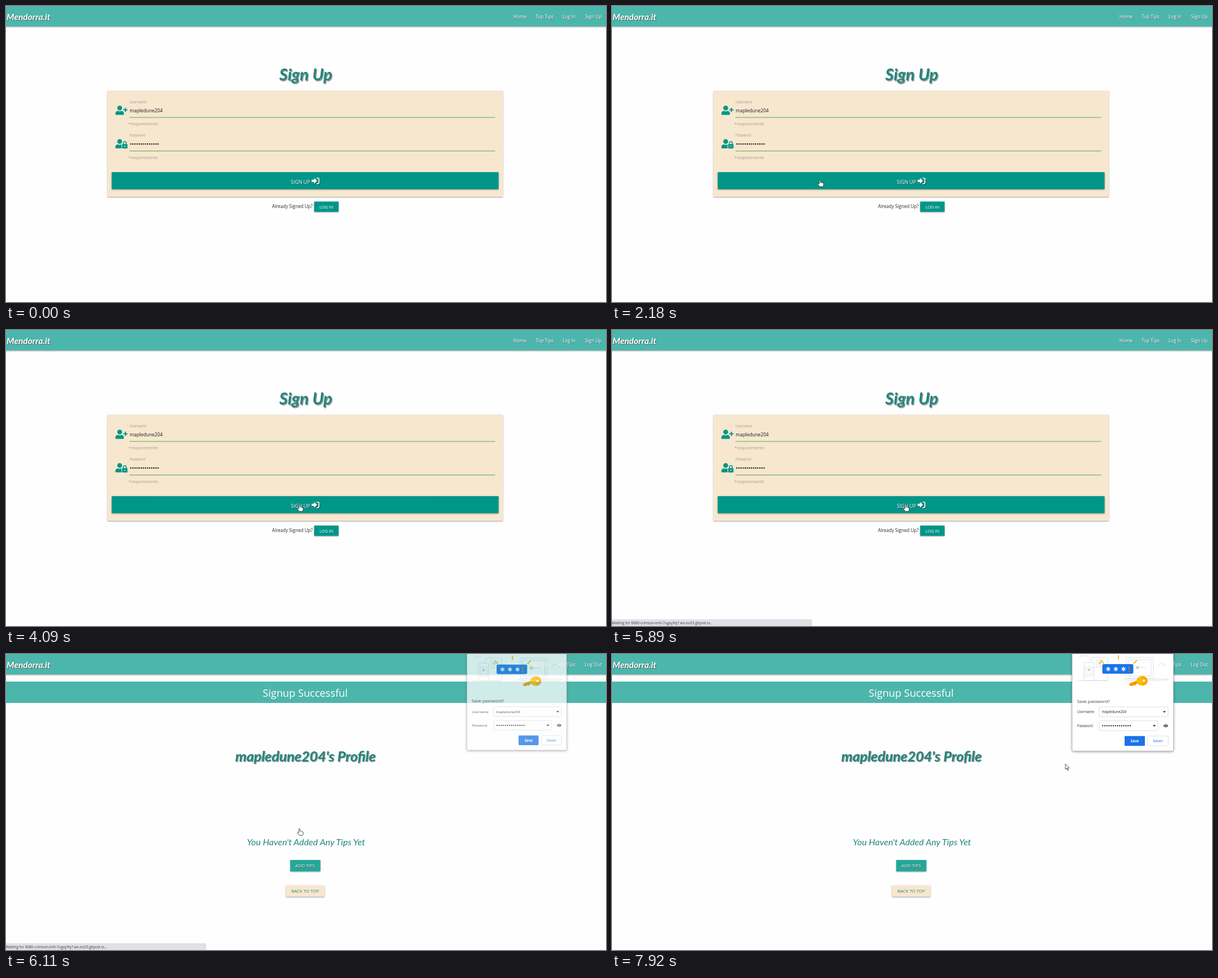
These frames come from a looping animation (1064 by 526 pixels, 7.99 s). An HTML page:

```html
<!DOCTYPE html>
<html lang="en">
<head>
<meta charset="utf-8">
<title>Sign up</title>
<style>
  html, body { margin: 0; width: 100%; height: 100%; overflow: hidden; background: #fefefe; }
  svg { display: block; width: 1064px; height: 526px; font-family: "Open Sans", "Noto Sans", sans-serif; }
  .script { font-family: Lato, "Open Sans", sans-serif; font-style: italic; font-weight: 700; fill: #23857c; }
  .brand { fill: #fff; text-shadow: 1px 1px 1px #45635f; }
  .title { text-shadow: 1.5px 1.5px 1px #8d9795; }
  .nav { font-size: 8.2px; fill: #fff; text-shadow: 1px 1px 1px #46706b; }
  .shade { text-shadow: 1px 1px 1px #24534e; }
  .raised { filter: drop-shadow(0 1px 1px rgba(0,0,0,.38)); }
  .mid { text-anchor: middle; }
  .hint { fill: #9d9c95; }
  .dots { stroke: #222; stroke-linecap: round; fill: none; }
  .art { fill: #fff; stroke: #dadce0; stroke-width: .9; }
  .field { fill: #fff; stroke: #d4d7db; stroke-width: .8; }
</style>
</head>
<body>
<svg viewBox="0 0 1064 526" xmlns="http://www.w3.org/2000/svg">
  <defs>
    <g id="person">
      <circle cx="7.6" cy="4.3" r="4.3"/>
      <path d="M0 16.6V14C0 11.300 2 9.600 4.500 9.600Q7.600 11 10.700 9.600C13.200 9.600 15.100 11.300 15.100 14V15.300Q15.100 16.600 13.800 16.600H1.300Q0 16.600 0 15.300Z"/>
    </g>
  </defs>

  <rect width="1064" height="526" fill="#fefefe"/>
  <g class="raised">
    <rect width="1064" height="36.300" fill="#4db6ac"/>
  </g>
  <text class="script brand" x="1" y="24.500" font-size="15.500">Mendorra.it</text>

  <g id="signup">
    <g class="nav">
      <text x="900" y="21.500">Home</text><text x="939.5" y="21.500">Top Tips</text>
      <text x="987" y="21.500">Log In</text><text x="1027" y="21.500">Sign Up</text>
    </g>
    <text class="script title mid" x="531.500" y="132" font-size="29">Sign Up</text>
    <rect class="raised" x="180" y="150.500" width="701" height="188.500" rx="1" fill="#f7e7cf"/>

    <g fill="#009688">
      <use href="#person" x="194" y="177"/>
      <path d="M208 184.500h7.500M211.750 180.700v7.600" stroke="#009688" stroke-width="2"/>
      <use href="#person" x="194" y="236.500"/>
      <path d="M205 244.500h10.800v9.500h-10.800z" fill="#f7e7cf"/>
      <rect x="206" y="245.200" width="9.400" height="8" rx="1"/>
      <path d="M208.200 245.500v-2a2.500 2.500 0 0 1 5 0v2" fill="none" stroke="#009688" stroke-width="1.500"/>
      <circle cx="210.700" cy="249.200" r="1" fill="#f7e7cf"/>
    </g>
    <g class="hint" font-size="6.200">
      <text x="219" y="172.500">Username</text><text x="219" y="232">Password</text>
    </g>
    <g class="hint" font-size="7.700">
      <text x="217" y="212">*requirements</text><text x="217" y="271.500">*requirements</text>
    </g>
    <text class="user" x="219.300" y="188.500" font-size="8.300" fill="#1d1d1d"></text>
    <path class="dots" d="M221.300 245.300h48.600" stroke-width="2.500" stroke-dasharray="0 3.720"/>
    <path d="M219 198h648.500" stroke="#4caf50"/>
    <path d="M219 257.700h648.500" stroke="#52a05a"/>

    <rect id="submit" class="raised" x="187.500" y="295.200" width="686" height="30.300" rx="1" fill="#009688"/>
    <circle id="ripple" cx="520" cy="310" r="7" fill="#fff" opacity=".2"/>
    <text class="shade" x="505.300" y="315.500" font-size="8.600" fill="#fff">SIGN UP</text>
    <g fill="#fff" style="filter:drop-shadow(1px 1px .5px #1d4d48)">
      <path d="M542 308.800h4.400v-3.300l5.200 5.300-5.200 5.300v-3.300h-4.400z"/>
      <path d="M550.800 306h2.700q1.500 0 1.500 1.500v6.600q0 1.500-1.500 1.500h-2.700" fill="none" stroke="#fff" stroke-width="1.700"/>
    </g>
    <text x="471.800" y="359" font-size="8.050" fill="#2b2b2b">Already Signed Up?</text>
    <rect class="raised" x="546.500" y="347.500" width="43.300" height="18.300" rx="1" fill="#009688"/>
    <text class="mid" x="568.200" y="359.500" font-size="7.400" fill="#fff">LOG IN</text>
  </g>

  <g id="profile">
    <g class="nav">
      <text x="889" y="21.500">Profile</text><text x="929.500" y="21.500">Top Tips</text>
      <text x="977" y="21.500">Add Tips</text><text x="1026.500" y="21.500">Log Out</text>
    </g>
    <rect y="49" width="1064" height="38" fill="#4db6ac"/>
    <text class="mid" x="530.500" y="75.700" font-size="18.200" fill="#fff">Signup Successful</text>
    <text class="script title mid" x="531" y="190.500" font-size="25"><tspan class="user"></tspan>'s Profile</text>
    <text class="script mid" x="532" y="340" font-size="16" style="font-weight:400">You Haven't Added Any Tips Yet</text>
    <rect class="raised" x="504" y="366" width="53.500" height="20.300" rx="1" fill="#26a69a"/>
    <text class="mid shade" x="530.700" y="379.300" font-size="8" fill="#fff">ADD TIPS</text>
    <rect class="raised" x="496.500" y="411" width="68.300" height="20.300" rx="1" fill="#f7e7cf"/>
    <text class="mid" x="530.600" y="424" font-size="7.900" fill="#2a857b">BACK TO TOP</text>

    <g id="popup">
      <rect x="816" y="-20" width="179.500" height="192.300" rx="2" fill="#fff" stroke="#b9bcbe" stroke-width=".8" style="filter:drop-shadow(0 1px 2px rgba(0,0,0,.4))"/>
      <g class="art">
        <path d="M828 7q4-7 9-3 3-3 6 1M968 22q5-8 10-3 3 0 5 3M826 47.500h54M908 44.500h79l-5 2.500h-69z"/>
        <rect x="850" y="6" width="29" height="41" rx="2"/>
        <rect x="837" y="15" width="18" height="32" rx="2"/>
        <rect x="912" y="6" width="48" height="37" rx="2"/>
        <rect x="916" y="10" width="40" height="29"/>
        <rect x="840" y="23" width="12" height="16"/>
        <rect x="859" y="11" width="12" height="13"/>
        <path d="M842 35h8M937 24h10M862 21h6"/>
      </g>
      <g fill="#d0d3d7">
        <circle cx="846" cy="28" r="2.500"/><circle cx="865" cy="16" r="2.500"/><circle cx="932" cy="24" r="3"/>
      </g>
      <path d="M898 2v7.500M866 11l6 6M931 11l-6 6" stroke="#fbbc04" stroke-width="2"/>
      <rect x="869.500" y="18" width="55" height="17" rx="2.500" fill="#1a73e8"/>
      <g id="stars" stroke="#fff" stroke-width="1.500"></g>
      <path d="M916.700 22v10" stroke="#e8710a" stroke-width="1.300"/>
      <path d="M937 45l-19 7-1 4 6 1 2-2 3 1 2-3 10-2z" fill="#f29900"/>
      <ellipse cx="940" cy="47.800" rx="10" ry="8.500" fill="#fbbc04"/>
      <path d="M940 39.300a10 8.500 0 0 1 0 17z" fill="#f5ad00"/>
      <circle cx="943" cy="47.500" r="2.200" fill="#fff"/>

      <text x="824.700" y="86.500" font-size="7.900" fill="#3c4043">Save password?</text>
      <g font-size="6.200" fill="#303134">
        <text x="825" y="105">Username</text><text x="825" y="129.700">Password</text>
      </g>
      <rect class="field" x="864" y="94" width="122" height="17.500" rx="1.500"/>
      <rect class="field" x="864" y="118.700" width="104" height="17.500" rx="1.500"/>
      <text class="user" x="868.500" y="105" font-size="6.200" fill="#202124"></text>
      <path class="dots" d="M870.300 127.500h48.800" stroke-width="2.300" stroke-dasharray="0 3.740"/>
      <path d="M977 101.500h5l-2.500 3zM959.300 126.200h5l-2.500 3z" fill="#222"/>
      <path d="M977.700 127.500q4.300-5.600 8.600 0-4.300 5.600-8.600 0z" fill="#3c4043"/>
      <circle cx="982" cy="127.500" r="1.500" fill="#3c4043" stroke="#fff" stroke-width=".7"/>
      <rect x="909" y="145.800" width="36" height="17.400" rx="1.500" fill="#1a73e8"/>
      <rect class="field" x="950" y="145.800" width="36.300" height="17.400" rx="1.500"/>
      <g class="mid" font-size="6.400">
        <text x="927" y="156.700" fill="#fff" font-weight="700">Save</text>
        <text x="968.200" y="156.700" fill="#1a73e8">Never</text>
      </g>
    </g>
  </g>

  <g id="status">
    <path d="M0 514h352.500q2.500 0 2.500 2.500V526H0z" fill="#dee1e6"/>
    <text x="-.5" y="522.500" font-size="6.450" fill="#3c4043">Waiting for 8080-crimson-krill-7ugxy9q7.ws-eu03.gitpod.io...</text>
  </g>

  <g id="cursor" stroke="#222" stroke-width=".8" fill="#fff" stroke-linejoin="round">
    <path id="arrow" d="M0 0V9.500L2.200 7.500 3.900 11.200 5.500 10.500 3.900 7H6.800Z"/>
    <path id="hand" d="M-1.200 7V.8Q-1.200-.3-.2-.3T.8.8V4.300Q2.400 3.600 2.800 4.800 4.300 4 4.700 5.300 6.500 4.800 6.500 6.500V8.500Q6.500 10 5.300 11.800H-.3L-3 8.500Q-4 6.800-2.900 6.200-2 5.800-1.200 7Z"/>
    <path id="beam" d="M-2-6Q0-6 0-5V5Q0 6-2 6M2-6Q0-6 0-5M0 5Q0 6 2 6" fill="none"/>
  </g>
</svg>
<script>
  const LOOP = 7990;
  const CLICK = 5500, WAIT = 5890, LOADED = 5970, POPUP_IN = 6030;
  const el = id => document.getElementById(id);
  const clamp = v => Math.min(1, Math.max(0, v));
  const easeOut = v => 1 - (1 - v) ** 3;
  const show = (id, on) => { el(id).style.display = on ? "" : "none"; };

  // Pointer hot spot: time, x, y
  const path = [
    [0, 1004, 530], [70, 1004, 530], [820, 827, 438], [890, 827, 438], [960, 777, 438],
    [1160, 777, 438], [1360, 781, 441], [1570, 777, 434], [1760, 777, 434],
    [2180, 369, 309.5], [2390, 301, 250], [2650, 301, 250], [2800, 301, 226], [3060, 301, 226],
    [3620, 531, 312], [3820, 531, 312], [4090, 520.5, 310.5], [7440, 520.5, 310.5],
    [7920, 804, 195.5], [LOOP, 804, 195.5]
  ];

  function pointerAt(t) {
    const i = path.findIndex(key => key[0] > t);
    const [t0, x0, y0] = path[i - 1], [t1, x1, y1] = path[i];
    const k = (t - t0) / (t1 - t0);
    return [x0 + (x1 - x0) * k, y0 + (y1 - y0) * k];
  }

  function pointerKind(t, x, y) {
    if (t >= LOADED) return t < 7450 ? "hand" : "arrow";
    if (y > 295 && y < 326 && x > 187 && x < 874) return "hand";
    if (y > 234 && y < 258 && x > 219 && x < 868) return "beam";
    return "arrow";
  }

  function draw(t) {
    const loaded = t >= LOADED;
    show("signup", !loaded);
    show("profile", loaded);
    show("ripple", t >= CLICK && t < CLICK + 60);

    show("status", t >= WAIT && t < 6430);
    el("status").style.opacity = 1 - clamp((t - 6230) / 200);

    const grow = easeOut(clamp((t - POPUP_IN) / 240));
    const scale = 0.95 + 0.05 * grow;
    el("popup").style.opacity = 0.1 + 0.9 * grow;
    el("popup").setAttribute("transform", `translate(906 78) scale(${scale}) translate(-906 -78)`);

    const [x, y] = pointerAt(t);
    const kind = pointerKind(t, x, y);
    for (const id of ["arrow", "hand", "beam"]) show(id, id === kind);
    el("cursor").setAttribute("transform", `translate(${x} ${y})`);
  }

  document.querySelectorAll(".user").forEach(node => { node.textContent = "mapledune204"; });
  el("stars").innerHTML = [880, 893.5, 907].map(x =>
    [0, 60, 120].map(a => `<path d="M0-4V4" transform="translate(${x} 26.7) rotate(${a})"/>`).join("")).join("");

  const start = performance.now();
  function tick() {
    draw((performance.now() - start) % LOOP);
    requestAnimationFrame(tick);
  }
  tick();
</script>
</body>
</html>
```
